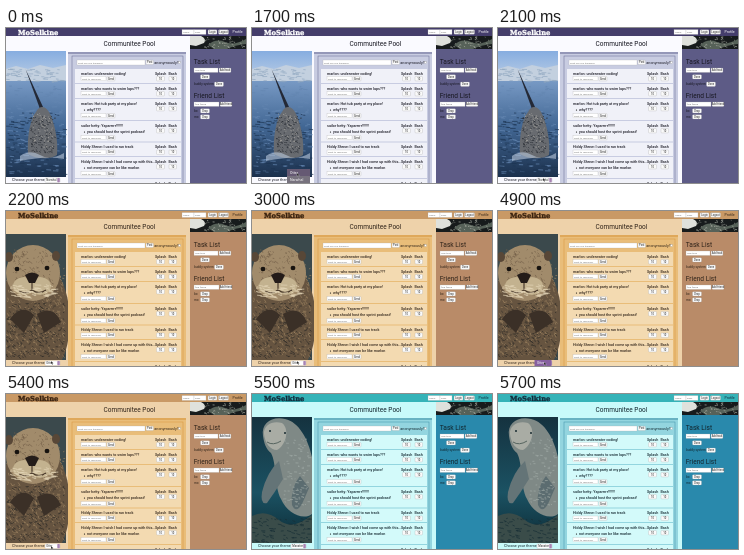
An HTML page that plays this animation: 240 by 155 pixels, repeating every 5.9 s.

```html
<!DOCTYPE html>
<html lang="en">
<head>
<meta charset="utf-8">
<title>Communitee Pool</title>
<style>
html, body { margin: 0; width: 100%; height: 100%; overflow: hidden; }
svg { display: block; width: 100vw; height: 100vh; font-family: Roboto, Arial, sans-serif; }
.narwhal { --head: #443d6b; --logo: #fff; --page: #fafaff; --side: #5d5b86; --panel: #c8cce1; --edge: #626590; --card: #f0f1f8; --ink: #181822; --nav: #fff; }
.otter { --head: #c99965; --logo: #39220f; --page: #eed2aa; --side: #b98b68; --panel: #e9bd79; --edge: #d6933c; --card: #f3dab1; --ink: #30241a; --nav: #35271c; }
.manatee { --head: #35b3b8; --logo: #102d3d; --page: #c8fafa; --side: #2989ac; --panel: #93d5df; --edge: #3f8fa6; --card: #d3fafa; --ink: #12262e; --nav: #102d3d; }
.photo { display: none; }
.narwhal .p-narwhal, .otter .p-otter, .manatee .p-manatee { display: inline; }
text { fill: var(--ink); }
</style>
</head>
<body>
<svg id="stage" class="narwhal" viewBox="0 0 240 155" preserveAspectRatio="none"></svg>
<script>
const stage = document.getElementById('stage');
const rect = (x, y, w, h, fill, more = '') =>
  `<rect x="${x}" y="${y}" width="${w}" height="${h}" fill="${fill}" ${more}/>`;
const text = (x, y, s, size = 3.7, more = '') =>
  `<text x="${x}" y="${y}" font-size="${size}" ${more}>${s}</text>`;
const shape = (d, fill, more = '') => `<path d="${d}" fill="${fill}" ${more}/>`;
const oval = (x, y, rx, ry, fill, more = '') =>
  `<ellipse cx="${x}" cy="${y}" rx="${rx}" ry="${ry}" fill="${fill}" ${more}/>`;
const field = (x, y, w, h, hint) =>
  rect(x, y, w, h, '#fff', 'stroke="#aaa" stroke-width=".25"') + text(x + 1, y + h - 1.3, hint, 2.5, 'style="fill:#777"');
const button = (x, y, w, label) =>
  rect(x, y, w, 4.4, '#fafafa', 'rx=".8" stroke="#999" stroke-width=".25"') +
  text(x + w / 2, y + 3.2, label, 2.7, 'text-anchor="middle" style="fill:#222"');

function random(seed) {
  return () => (seed = seed * 16807 % 2147483647) / 2147483647;
}

// Short random strokes for water, fur and skin.
function specks(seed, n, [left, top, w, h], color, length, slope) {
  const r = random(seed);
  let d = '';
  for (let i = 0; i < n; i++) {
    const x = left + r() * w, y = top + r() * h;
    d += `M${x.toFixed(1)} ${y.toFixed(1)}l${(length * (.4 + r())).toFixed(1)} ${(slope * (r() - .3)).toFixed(1)}`;
  }
  return `<path d="${d}" stroke="${color}" stroke-width=".7" fill="none"/>`;
}

const PHOTO = [0, 23, 60, 126];

function photos() {
  const narwhal = rect(...PHOTO, 'url(#sea)') +
    shape('M0 41L10 38 22 41 34 37 47 40 60 37V53H0Z', '#c3d0df') +
    specks(19, 60, [0, 41, 55, 13], '#93a9c2', 4, .6) +
    specks(31, 170, [0, 58, 57, 88], '#6386b0', 4, .7) +
    specks(37, 120, [0, 85, 57, 62], '#1e3554', 4, .7) +
    shape('M19.5 41L37 79 34 81Z', '#242936') +
    shape('M22 126C21 109 24 91 30 84 34 76 41 78 45 88 50 101 52 114 51 127 43 132 30 131 22 126Z', '#686b70') +
    specks(73, 150, [24, 88, 24, 37], '#292d34', 1.4, 1.6) +
    specks(23, 60, [26, 85, 20, 35], '#b4b0aa', 1.1, 1) +
    shape('M14 128Q24 121 34 127T58 125V131Q42 127 14 133Z', '#b9c9dc', 'opacity=".6"');
  const otter = rect(...PHOTO, '#3b494c') +
    oval(28, 110, 36, 62, '#665440') +
    specks(47, 420, [0, 52, 58, 92], '#9b815f', 1.5, 5) +
    specks(91, 240, [0, 92, 58, 54], '#2e2b27', 2, 4) +
    oval(27, 62, 27, 28, '#a18b6b') + oval(3, 46, 4, 5, '#584737') + oval(50, 45, 4, 5, '#584737') +
    specks(57, 160, [7, 39, 40, 46], '#74604a', 1.2, 4) +
    oval(18, 75, 11, 9, '#c3b28f') + oval(34, 75, 11, 9, '#c3b28f') +
    oval(11, 58, 2.4, 2.2, '#17130f') + oval(41, 57, 2.4, 2.2, '#17130f') +
    shape('M19 64Q26 59 33 64L29 72H23Z', '#241c19') +
    shape('M26 72V79Q20 84 13 80M26 79Q33 84 40 79', 'none', 'stroke="#49392b" stroke-width="1.2"') +
    specks(12, 65, [4, 73, 42, 13], '#e3d5b6', 5, 2) +
    shape('M4 108Q16 92 28 104L18 122Z M31 103Q47 93 55 111L38 122Z', '#3b3027');
  const manatee = rect(...PHOTO, 'url(#deep)') +
    shape('M0 122Q14 115 27 126T60 121V149H0Z', '#3a4c49') +
    specks(41, 80, [0, 124, 57, 24], '#182f35', 3, 2) +
    shape('M11 42C9 29 20 22 33 25 47 28 56 45 60 63V120C51 127 35 119 29 105 22 92 25 70 19 59 14 55 12 49 11 42Z', '#7f8986') +
    shape('M12 40C11 31 21 26 30 29 38 35 34 51 25 56 18 56 13 49 12 40Z', '#a9aca4') +
    shape('M27 67Q15 78 10 98Q8 111 15 109Q23 98 31 85Z', '#647477') +
    shape('M48 82Q38 94 40 111Q44 120 50 110L57 94Z', '#5b6c70') +
    oval(18, 37, 1, 1, '#182b30') + oval(33, 39, 1, 1, '#182b30') +
    shape('M15 48Q21 52 29 47', 'none', 'stroke="#56645f"') +
    specks(61, 90, [31, 45, 25, 67], '#a0aaa5', 2.4, .8);
  return [['narwhal', narwhal], ['otter', otter], ['manatee', manatee]]
    .map(([name, art]) => `<g class="photo p-${name}">${art}</g>`).join('');
}

function banner() {
  return rect(184, 8, 56, 13, '#171b1c') +
    shape('M184 8H195Q201 11 198 15L190 18 184 17Z', '#dfe1dc') +
    shape('M202 17Q210 10 219 14T240 11V16Q229 17 221 21H208Z', '#566158') +
    specks(83, 45, [198, 9, 39, 11], '#a5aaa0', 1.5, 1.5);
}

const posts = [
  [41, 14, 'marlon: underwater coding!'],
  [56, 14, 'marlon: who wants to swim laps???'],
  [71, 21, 'marlon: Hot tub party at my place!', 'why????'],
  [93, 20.5, 'sailor hetty: Yaparrrrr!!!!!!!', 'you should host the sprint podcast!'],
  [114.5, 13.5, 'Hiddy Shrew: I used to run track'],
  [129, 21, 'Hiddy Shrew: I wish I had come up with this...', 'not everyone can be like marlon'],
  [151, 14, '']
];

function post([y, h, title, reply]) {
  const inputY = y + (reply ? 14.5 : 7.5);
  return rect(69, y, 106, h, 'var(--card)') + text(75, y + 5.8, title, 3.7, 'font-weight="500"') +
    (reply ? `<circle cx="78.5" cy="${y + 11}" r=".6"/>` + text(81, y + 12.3, reply, 3.7, 'font-weight="500"') : '') +
    field(75, inputY, 25, 4.3, 'want to respond?') + button(101, inputY, 8, 'Send') +
    text(149, y + 5.8, 'Splash', 3.7, 'font-weight="500"') + text(162.5, y + 5.8, 'Bash', 3.7, 'font-weight="500"') +
    button(150.5, y + 7.5, 8, '10') + button(163, y + 7.5, 7.5, '10');
}

function sidebar() {
  return rect(184, 8, 56, 147, 'var(--side)') + banner() +
    text(187.8, 35.5, 'Task List', 6.6) + field(188, 40, 24, 4.4, 'new task') + button(213, 40, 12, 'Add task') +
    button(194.5, 46.7, 9, 'Done') +
    text(188, 57.3, 'buddy system', 3.2) + button(208.5, 54, 9, 'Done') +
    text(187.8, 69.5, 'Friend List', 6.6) + field(188, 74, 25, 4.4, 'find friend') + button(214, 74, 12, 'Add friend') +
    text(188, 84, 'bo', 3.2) + button(194.5, 80.7, 9, 'Drop') +
    text(188, 90, 'mo', 3.2) + button(194.5, 86.7, 9, 'Drop');
}

function item(id, y, label) {
  return `<g id="${id}">` + rect(35, y, 23, 7, '#77727e', `id="${id}-back"`) +
    text(38, y + 4.8, label, 3.6, 'style="fill:#fff"') + '</g>';
}

stage.innerHTML = `<defs>
  <linearGradient id="sea" x2="0" y2="1"><stop stop-color="#86ade0"/><stop offset=".2" stop-color="#b5cae4"/><stop offset=".24" stop-color="#7799c4"/><stop offset=".6" stop-color="#426794"/><stop offset="1" stop-color="#1b304c"/></linearGradient>
  <linearGradient id="deep" x2="0" y2="1"><stop stop-color="#15323f"/><stop offset=".6" stop-color="#1b5263"/><stop offset="1" stop-color="#0d2b35"/></linearGradient>
  </defs>` +
  rect(0, 0, 240, 155, 'var(--page)') + photos() + sidebar() +
  rect(0, 0, 240, 8, 'var(--head)') +
  text(12, 6.6, 'MoSelkine', 6.8, 'font-weight="700" stroke="var(--logo)" stroke-width=".35" style="fill:var(--logo);font-family:\'DejaVu Serif\',serif"') +
  field(176, 1.6, 12, 4.8, 'name') + field(188, 1.6, 12, 4.8, 'pass') +
  button(202, 1.8, 9, 'Login') + button(212.5, 1.8, 10, 'Logout') +
  text(226.5, 5.3, 'Profile', 3.6, 'style="fill:var(--nav)"') +
  text(123.5, 18.3, 'Communitee Pool', 6.5, 'text-anchor="middle"') +
  rect(62, 24, 118, 131, 'var(--panel)') + rect(62, 24.5, 118, 1, 'var(--edge)') +
  rect(66, 28, 111, 128, 'none', 'stroke="var(--edge)" stroke-width=".5"') +
  field(71, 32, 68, 5, 'what are you thinking?') +
  button(140, 32.2, 7.5, 'Post') + text(148.3, 36, 'anonymously?', 3.8) +
  rect(172.5, 33.5, 2, 2, '#fff', 'stroke="#888" stroke-width=".3"') +
  posts.map(post).join('') +
  rect(0, 149, 60, 6, 'var(--page)') + text(6, 153.4, 'Choose your theme:', 3.8) +
  rect(39, 149.8, 15, 4.7, '#fff', 'rx="1" stroke="#aaa" stroke-width=".3"') +
  text(40.2, 153.2, 'Narwhal', 2.8, 'id="choice" style="fill:#333"') +
  rect(51.3, 150.1, 2.5, 4.1, '#a884b4', 'rx=".6"') +
  item('upper', 141, 'Otter') + item('lower', 148, 'Narwhal') +
  `<g id="chosen">${rect(36.5, 149, 17, 6, '#8660a0')}${text(39, 153.2, 'Otter', 3.2, 'style="fill:#fff"')}</g>` +
  shape('M0 0V3.3L.8 2.6 1.4 3.8 2 3.5 1.4 2.3H2.5Z', '#111', 'id="pointer" stroke="#fff" stroke-width=".25"');

const get = id => document.getElementById(id);
const show = (id, on) => get(id).style.display = on ? '' : 'none';
const themes = [[0, 'narwhal', 'Narwhal'], [2200, 'otter', 'Otter'], [5500, 'manatee', 'Manatee']];

// Time, x, y: the pointer rests between its short moves.
const route = [[0, 45, 157], [600, 45, 157], [700, 45, 151], [1000, 45, 151], [1400, 45, 145],
  [1700, 45, 145], [2100, 45, 150], [3300, 45, 150], [3600, 46, 151], [4900, 46, 151],
  [5400, 45, 152], [5500, 45, 157], [5900, 45, 157]];

function pointerAt(t) {
  const next = route.findIndex(p => p[0] > t);
  const a = route[next - 1], b = route[next];
  const k = (t - a[0]) / (b[0] - a[0]);
  return [a[1] + (b[1] - a[1]) * k, a[2] + (b[2] - a[2]) * k];
}

function draw(now) {
  const t = Math.floor(now % 5900 / 100) * 100;
  const [, name, label] = themes.filter(theme => theme[0] <= t).pop();
  stage.setAttribute('class', name);
  get('choice').textContent = label;
  const open = t >= 700 && t < 1800;
  const onUpper = t >= 1300;
  show('upper', open);
  show('lower', open);
  get('upper-back').setAttribute('fill', onUpper ? '#655973' : '#77727e');
  get('lower-back').setAttribute('fill', onUpper ? '#77727e' : '#655973');
  show('chosen', t >= 3400 && t < 5000);
  get('pointer').setAttribute('transform', `translate(${pointerAt(t)})`);
}

function tick() {
  draw(performance.now());
  requestAnimationFrame(tick);
}
tick();
</script>
</body>
</html>
```
